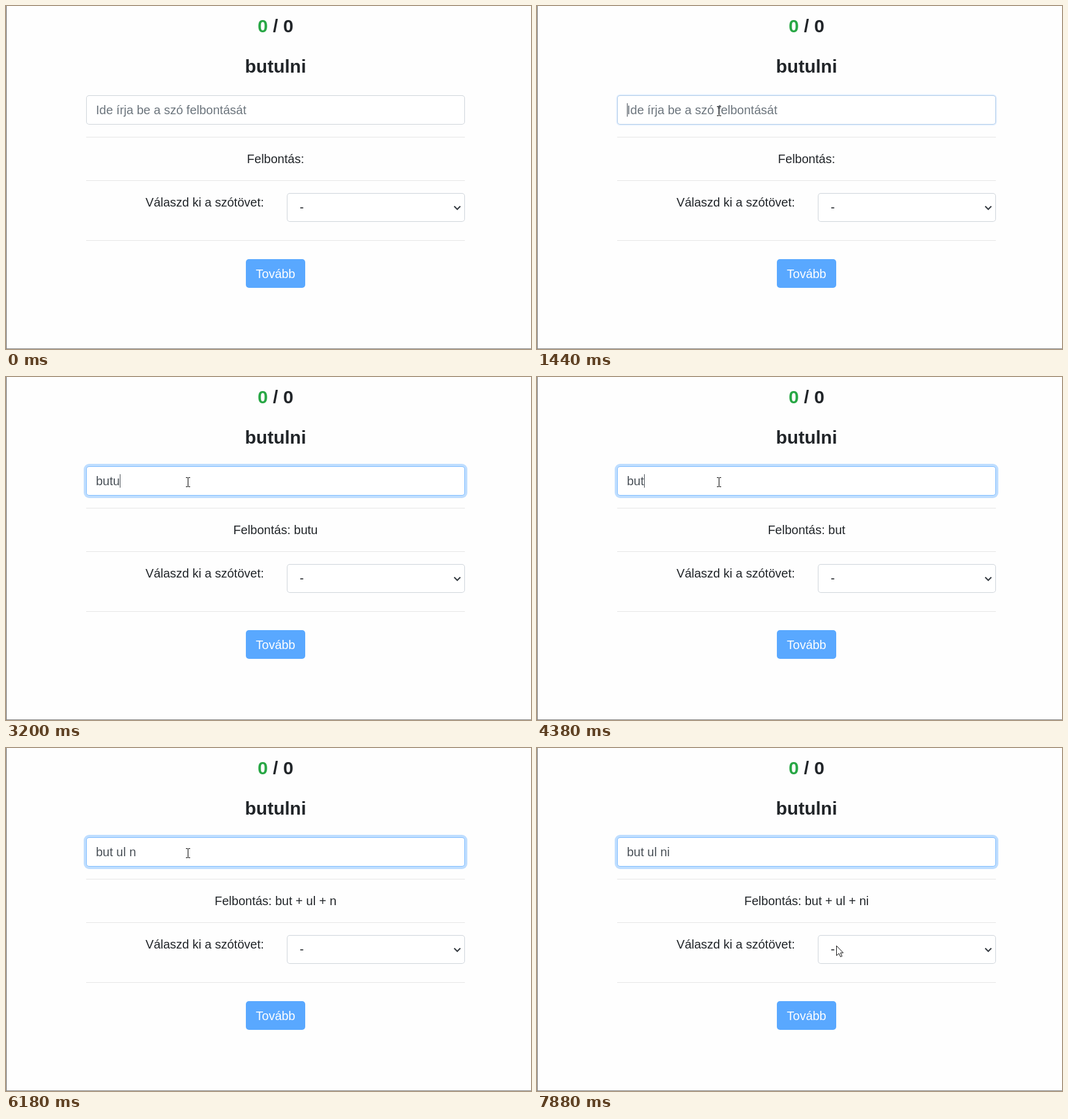
Recreate the animation shown at these times as an HTML page with a canvas. Size 858 px wide and 561 px high, loop 8000 ms.

```html
<!DOCTYPE html>
<html lang="hu">
<head>
<meta charset="utf-8">
<title>Szóelemzés</title>
<style>
html, body { margin: 0; width: 100%; height: 100%; overflow: hidden; background: #fefefe; }
canvas { display: block; }
</style>
</head>
<body>
<canvas id="stage" width="858" height="561"></canvas>
<script>
const ctx = document.getElementById('stage').getContext('2d');
const LOOP = 8000;
const MID = 440.5;
const INK = '#212529';
const FONT = '"Liberation Sans", Arial, sans-serif';
const BODY = '20px ' + FONT;
const HEAD = 'bold 30px ' + FONT;

// time, typed text, caret visible
const typing = [
  [0, '', false], [1440, '', true], [1890, '', false],
  [2390, 'b', true], [2510, 'b', false],
  [2750, 'bu', true], [2870, 'bu', false], [2960, 'but', true],
  [3200, 'butu', true], [3450, 'butu', false], [4040, 'butu', true],
  [4380, 'but', true], [4620, 'but', false],
  [4870, 'but ', true], [5110, 'but ', false], [5210, 'but u', true],
  [5580, 'but ul', false], [5820, 'but ul ', true], [5940, 'but ul ', false],
  [6060, 'but ul n', true], [6180, 'but ul n', false],
  [6420, 'but ul ni', true], [6660, 'but ul ni', false],
  [7280, 'but ul ni', true], [7760, 'but ul ni', false]
];

const smooth = p => p * p * (3 - 2 * p);
const mix = (a, b, p) => a + (b - a) * p;

function rect(x, y, w, h, color) {
  ctx.fillStyle = color;
  ctx.fillRect(x, y, w, h);
}

function box(x, y, w, h, r, color) {
  ctx.beginPath();
  ctx.roundRect(x, y, w, h, r);
  ctx.fillStyle = color;
  ctx.fill();
}

function field(x, y, w, h, border) {
  box(x, y, w, h, 5, border);
  box(x + 1, y + 1, w - 2, h - 2, 4, '#fff');
}

function label(str, x, y, color = INK, align = 'left', font = BODY) {
  ctx.font = font;
  ctx.textAlign = align;
  ctx.fillStyle = color;
  ctx.fillText(str, x, y);
}

function score() {
  ctx.font = HEAD;
  const left = MID - ctx.measureText('0 / 0').width / 2;
  label('0', left, 43, '#28a745', 'left', HEAD);
  label(' / 0', left + ctx.measureText('0').width, 43, INK, 'left', HEAD);
}

function input(focus, text, caret) {
  if (focus) {
    const s = 4 * focus;
    box(131 - s, 146 - s, 619 + 2 * s, 48 + 2 * s, 5 + s, `rgba(0,123,255,${0.25 * focus})`);
  }
  const border = [[206, 128], [212, 189], [218, 255]].map(([a, b]) => Math.round(mix(a, b, focus)));
  field(131, 146, 619, 48, `rgb(${border})`);
  if (text) label(text, 147, 177, '#495057');
  else label('Ide írja be a szó felbontását', 147, 177, '#6c757d');
  if (caret) {
    ctx.font = BODY;
    rect(Math.round(147 + ctx.measureText(text).width), 159, 1, 22, '#495057');
  }
}

function select() {
  field(459, 306, 291, 47, '#ced4da');
  label('-', 480, 336);
  ctx.beginPath();
  ctx.moveTo(732.5, 327.5);
  ctx.lineTo(737.5, 332.5);
  ctx.lineTo(742.5, 327.5);
  ctx.strokeStyle = '#343a40';
  ctx.lineWidth = 2;
  ctx.stroke();
}

function arrow(x, y) {
  const points = [[0, 0], [0, 16], [4, 12.5], [6.5, 18], [9, 17], [6.5, 11.5], [11, 11.5]];
  ctx.beginPath();
  points.forEach(([px, py]) => ctx.lineTo(x + px + 0.5, y + py + 0.5));
  ctx.closePath();
  ctx.fillStyle = '#fff';
  ctx.fill();
  ctx.strokeStyle = '#111';
  ctx.lineWidth = 1;
  ctx.stroke();
}

function beam(x, y) {
  rect(x, y - 7, 1, 14, '#000');
  for (const row of [y - 8, y + 7]) {
    rect(x - 3, row, 3, 1, '#000');
    rect(x + 1, row, 3, 1, '#000');
  }
}

function pointer(t) {
  if (t < 510) return null;
  if (t < 1440) {
    const p = smooth(Math.min(6, Math.floor((t - 510) / 113)) / 6);
    return [mix(372, 297, p), mix(534, 172, p)];
  }
  if (t < 7140) return [297, 172];
  if (t < 7280) return [297, 170];
  const p = smooth(Math.min(6, Math.floor((t - 7280) / 120) + 1) / 6);
  return [mix(297, 489, p), mix(170, 323, p)];
}

function cursor(t, textWidth) {
  const pos = pointer(t);
  if (!pos) return;
  const [x, y] = pos.map(Math.round);
  const overText = Math.abs(y - 250) < 12 && Math.abs(x - MID) < textWidth / 2;
  if (y < 194 || overText) beam(x, y);
  else arrow(x, y);
}

function draw(t) {
  const [, text, caret] = typing.findLast(step => step[0] <= t);
  const parts = ('Felbontás: ' + text.replaceAll(' ', ' + ')).trim();

  rect(0, 0, 858, 561, '#fefefe');
  score();
  label('butulni', MID, 109, INK, 'center', HEAD);
  input(t < 1440 ? 0 : t < 1560 ? 0.4 : 1, text, caret);
  for (const y of [214, 285, 383]) rect(131, y, 619, 1, '#e5e5e5');

  label(parts, MID, 257, INK, 'center');
  const width = ctx.measureText(parts).width;
  label('Válaszd ki a szótövet:', 421.5, 328, INK, 'right');
  select();
  box(392, 414, 97, 47, 5, '#59a8ff');
  label('Tovább', MID, 445, '#fff', 'center');

  rect(0, 0, 1, 561, '#6b6b6b');
  rect(0, 560, 858, 1, '#858585');
  cursor(t, width);
}

function tick() {
  draw(performance.now() % LOOP);
  requestAnimationFrame(tick);
}
tick();
</script>
</body>
</html>
```
